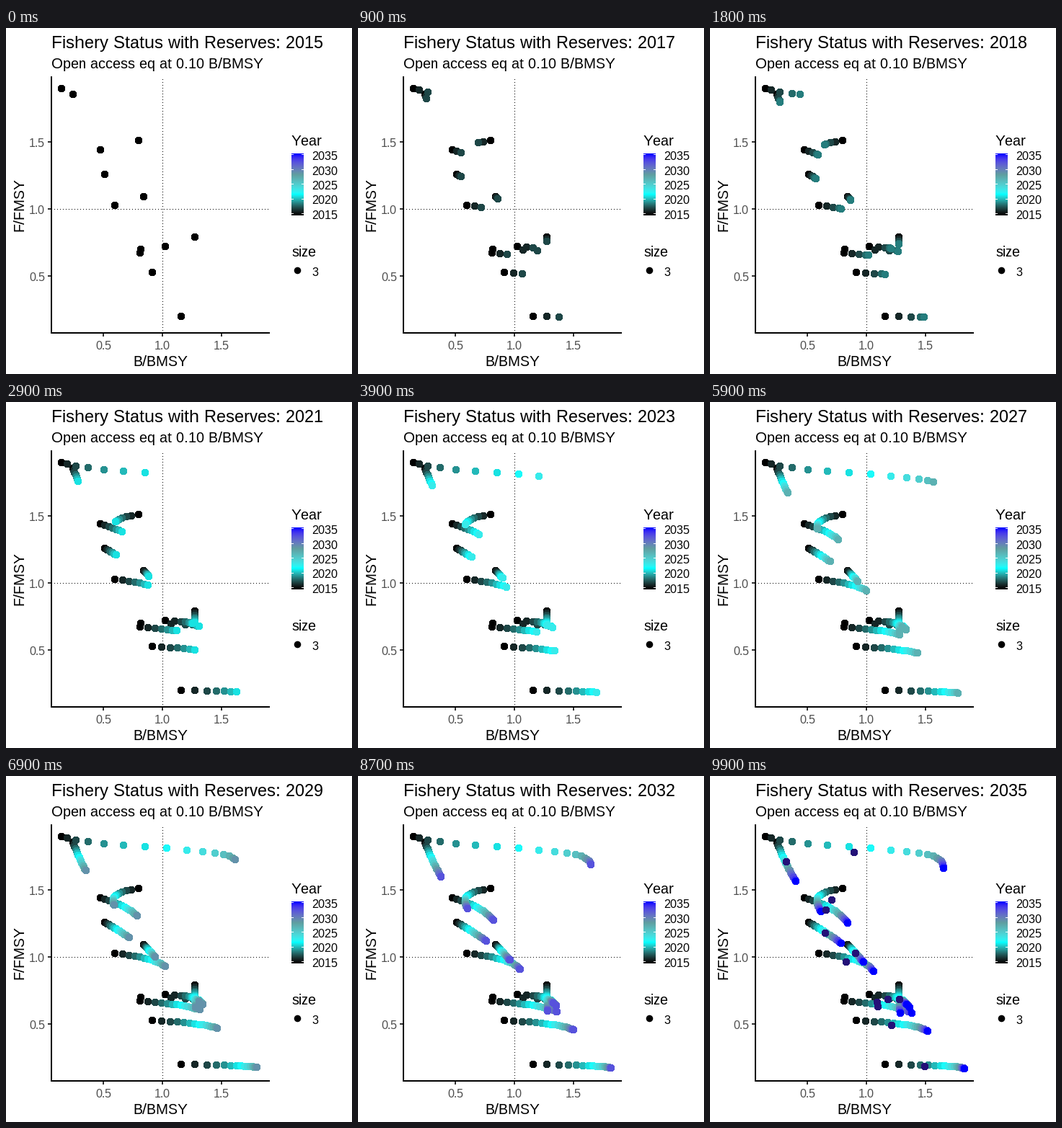
These frames come from a looping animation (480 px wide and 480 px high, 10000 ms). A matplotlib script:

```python
import matplotlib.pyplot as plt
import numpy as np
from matplotlib.animation import FuncAnimation
from matplotlib.patches import Rectangle

plt.rcParams.update({
    "font.family": ["Liberation Sans", "DejaVu Sans"],
    "text.hinting": "native",       # whole-pixel glyph advances, no kerning
    "text.hinting_factor": 1,
    "text.kerning_factor": 6,
})

SIZE, DPI = 480, 72          # at 72 dpi one point is one pixel
FIRST, SPAN = 2015, 20
YEARS = np.arange(SPAN + 1)
FRAMES, INTERVAL = 100, 100
STEPS = np.array([*range(3, 84, 5), *range(87, 96, 4)])   # halfway between years


# --- colour scale, blended in CIE Lab ---
M = np.array([[0.4124, 0.3576, 0.1805],
              [0.2126, 0.7152, 0.0722],
              [0.0193, 0.1192, 0.9505]])
WHITE = M.sum(axis=1)


def to_lab(rgb):
    c = np.asarray(rgb, float) / 255
    lin = np.where(c > 0.04045, ((c + 0.055) / 1.055) ** 2.4, c / 12.92)
    t = lin @ M.T / WHITE
    f = np.where(t > 0.008856, np.cbrt(t), 7.787 * t + 16 / 116)
    x, y, z = f.T
    return np.stack([116 * y - 16, 500 * (x - y), 200 * (y - z)], axis=-1)


def to_rgb(lab):
    l, a, b = np.asarray(lab).T
    y = (l + 16) / 116
    f = np.stack([y + a / 500, y, y - b / 200], axis=-1)
    t = np.where(f > 0.2069, f ** 3, (f - 16 / 116) / 7.787)
    lin = np.clip(t * WHITE @ np.linalg.inv(M).T, 0, 1)
    c = np.where(lin > 0.0031308, 1.055 * lin ** (1 / 2.4) - 0.055, 12.92 * lin)
    return np.clip(c, 0, 1)


# black, cyan, cadet blue, blue
STOPS = to_lab([(0, 0, 0), (0, 255, 255), (95, 158, 160), (0, 0, 255)])


def year_lab(t):
    at = np.linspace(0, SPAN, len(STOPS))
    return np.stack([np.interp(t, at, ch) for ch in STOPS.T], axis=-1)


# --- paths of the stocks, in pixels ---
def growth(rate, lag=0):
    """Logistic rise from 0 to 1 over the span; without lag a plain saturation."""
    e = np.exp(-rate * YEARS)
    g = (1 - e) / (1 + lag * e)
    return g / g[-1]


def track(start, end, rate, y_rate=0.01, lag=0, drift=0):
    """Biomass saturates (plus a steady drift) while fishing pressure eases off."""
    (x0, y0), (x1, y1) = start, end
    x = x0 + (x1 - x0 - drift * SPAN) * growth(rate, lag) + drift * YEARS
    y = y0 + (y1 - y0) * growth(y_rate)
    return np.column_stack([x, y])


TRACKS = [
    track((77, 84), (324, 128), 0.47, lag=16.8),
    track((93, 92), (119, 146), -0.01, y_rate=0.015),
    track((184, 156), (154, 188), 0.25, drift=0.9),
    track((131, 169), (191, 204), 0.09),
    track((137, 203), (182, 232), 0.025),
    track((191, 234), (213, 258), 0.015),
    track((151, 246), (227, 271), 0.14),
    track((187, 307), (277, 321), 0.75, drift=0.6),
    track((186, 312), (280, 329), 0.11),
    track((221, 303), (273, 317), 0.4, drift=0.75),
    track((262, 290), (264, 329), -0.1, y_rate=0.05),
    track((203, 339), (302, 354), 0.135),
    track((243, 400), (353, 406), 0.19),
]
POS = np.stack(TRACKS, axis=1)                       # year, stock, xy
LAB = np.repeat(year_lab(YEARS)[:, None], len(TRACKS), axis=1)


# --- static parts ---
fig = plt.figure(figsize=(SIZE / DPI, SIZE / DPI), dpi=DPI, facecolor="white")
ax = fig.add_axes([0, 0, 1, 1])


def text(x, y, s, size=20, color="black", **kw):
    return ax.text(x, y, s, fontsize=size, color=color, va="baseline", **kw)


def rect(x, y, w, h, color="black", zorder=4):
    ax.add_patch(Rectangle((x, y), w, h, color=color, lw=0,
                           antialiased=False, zorder=zorder))


def dots(x, y):
    return ax.scatter(x, y, s=9.6 ** 2, c="black", linewidths=0,
                      antialiased=False, zorder=3)


title = text(63, 28, "", 24)
text(63, 56, "Open access eq at 0.10 B/BMSY")
text(214.5, 469, "B/BMSY", ha="center")
text(24, 245, "F/FMSY", ha="center", rotation=90, rotation_mode="anchor")

# dotted reference lines at 1.0
for x in range(63, 366, 4):
    rect(x, 251, 1, 1, zorder=1)
for y in range(423, 67, -4):
    rect(217, y, 1, 1, zorder=1)

# axes
rect(62, 67, 2, 357)
rect(62, 422, 304, 2)
for i, label in enumerate(("0.5", "1.0", "1.5")):
    x, y = 135 + 82 * i, 344 - 93 * i
    rect(x - 1, 424, 2, 4, "#333333")
    rect(58, y - 1, 4, 2, "#333333")
    text(x, 446, label, 16, "#4d4d4d", ha="center")
    text(54, y + 7, label, 16, "#4d4d4d", ha="right")

# legends
text(396, 163, "Year")
rows = np.arange(174, 260) + 0.5
ramp = to_rgb(year_lab((258 - rows) / 82 * SPAN))
ax.imshow(ramp[:, None], extent=(396, 413, 260, 174), interpolation="nearest",
          aspect="auto", zorder=2)
for i in range(5):
    y = 257.5 - 20.5 * i
    for x in (396, 410):
        rect(x, int(y), 3, 1, "white")
    text(424, y + 7.5, str(FIRST + 5 * i), 16)
text(396, 317, "size")
dots([404], [336])
text(424, 343.5, "3", 16)

points = dots([], [])

ax.set_xlim(0, SIZE)
ax.set_ylim(SIZE, 0)
ax.axis("off")


def draw(n):
    year = int((STEPS < n).sum())
    xy, lab = POS[:year + 1], LAB[:year + 1]
    if n in STEPS or n == FRAMES - 1:
        pair = [year, (year + 1) % len(YEARS)]
        xy = np.concatenate([xy, POS[pair].mean(axis=0, keepdims=True)])
        lab = np.concatenate([lab, LAB[pair].mean(axis=0, keepdims=True)])
    points.set_offsets(np.rint(xy.reshape(-1, 2)))
    points.set_facecolor(to_rgb(lab.reshape(-1, 3)))
    title.set_text(f"Fishery Status with Reserves: {FIRST + year}")
    return points, title


anim = FuncAnimation(fig, draw, frames=FRAMES, interval=INTERVAL,
                     repeat=True, repeat_delay=0, blit=False)
plt.show()
```
